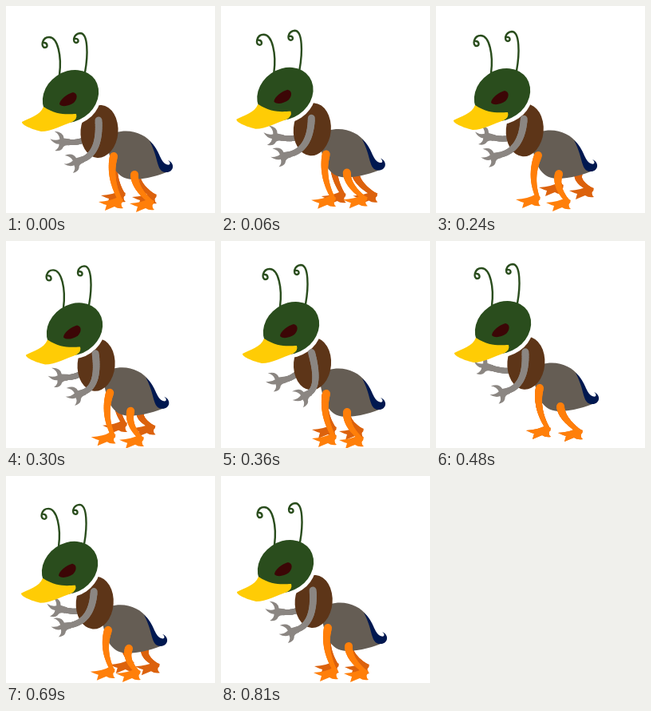
An HTML page with a canvas for the animation above (0.84 s loop, 262 px wide and 259 px high).

```html
<!DOCTYPE html>
<html lang="en">
<head>
<meta charset="utf-8">
<title>Walking duck-ant</title>
<style>
  html, body { margin: 0; width: 100%; height: 100%; overflow: hidden; background: #fff; }
  canvas { display: block; }
</style>
</head>
<body>
<canvas id="stage" width="262" height="259"></canvas>
<script>
const ctx = document.getElementById('stage').getContext('2d');
const LOOP = 840, STEP = 30;
const GREEN = '#2a4d1d', BROWN = '#5d3518', GREY = '#655d54', ARM = '#8b8682',
      NAVY = '#001850', YELLOW = '#ffcc05', ORANGE = '#ff7f0a', SHADE = '#dc620d', EYE = '#3c0606';

// Key poses: positions of each moving joint at the given times.
const times = [0, 150, 240, 360, 480, 600, 810];
const tracks = {
  head:      [[81, 113], [80, 106], [83, 111], [88, 109], [84, 108], [80, 115], [81, 113]],
  abdomen:   [[158, 187], [150, 182], [151, 186], [155, 190], [153, 183], [148, 192], [157, 189]],
  nearHand:  [[93, 193], [70, 178], [77, 187], [109, 191], [88, 188], [70, 184], [93, 193]],
  farHand:   [[76, 170], [70, 157], [69, 164], [77, 174], [67, 158], [68, 164], [76, 170]],
  frontFoot: [[144, 244], [136, 239], [128, 241], [142, 246], [141, 236], [129, 242], [144, 245]],
  backFoot:  [[183, 246], [176, 236], [166, 245], [176, 248], [181, 239], [159, 245], [182, 246]],
  farShift:  [[3, -8], [26, -2], [29, -15], [0, -11], [0, 0], [34, -8], [1, -8]]
};

const shapes = {
  abdomen: 'M-32-22C-12-38 16-29 26-14C33 0 36 14 46 20C36 24 18 30 0 30C-20 29-28 12-32-22Z',
  tail: 'M22-18C34-8 34 4 41 10C47 14 50 10 45 6C55 10 52 22 42 21C30 20 34 4 22-18Z',
  beak: 'M-34 13C-38 24-52 27-61 32C-62 36-46 42-37 44C-24 44-10 36 2 32Q9 28 7 22C-2 22-16 25-34 13Z',
  eye: 'M-14 10C-14 4-4-3 3-5C9-4 9 3 4 8C-2 12-10 14-14 10Z',
  antennae: 'M-14-27C-11-50-16-74-27-74C-36-74-38-61-32-61C-28-61-29-67-33-67' +
            'M18-30C22-52 22-79 12-79C3-78 2-67 7-67C11-67 10-73 6-72',
  hand: 'M-4-4Q3-4 4-9Q6-13 13-13Q8-9 9-4Q15-5 21 1Q14-1 9 2Q10 8 17 11Q6 12 4 4L-4 4Z',
  foot: 'M-4-5Q-12 0-28 1Q-22 4-18 5L-20 12Q-13 9-8 7Q-4 10 3 9Q-2 5 3-2Z'
};
for (const name in shapes) shapes[name] = new Path2D(shapes[name]);

const add = (p, x, y) => [p[0] + x, p[1] + y];

// Smooth cyclic curve through the key poses.
function sample(keys, t) {
  const n = times.length;
  const time = i => times[(i + n) % n] + Math.floor(i / n) * LOOP;
  const key = i => keys[(i + n) % n];
  let i = n - 1;
  while (times[i] > t) i--;
  const span = time(i + 1) - time(i), u = (t - time(i)) / span;
  return [0, 1].map(axis => {
    const slope = j => (key(j + 1)[axis] - key(j - 1)[axis]) / (time(j + 1) - time(j - 1)) * span;
    const a = key(i)[axis], b = key(i + 1)[axis], ease = u * u * (3 - 2 * u);
    return a + (b - a) * ease + u * (1 - u) * ((1 - u) * slope(i) - u * slope(i + 1));
  });
}

function fill(name, [x, y], color, angle = 0) {
  ctx.save();
  ctx.translate(x, y);
  ctx.rotate(angle);
  ctx.fillStyle = color;
  ctx.fill(shapes[name]);
  ctx.restore();
}

function oval([x, y], rx, ry, angle, color) {
  ctx.fillStyle = color;
  ctx.beginPath();
  ctx.ellipse(x, y, rx, ry, angle, 0, Math.PI * 2);
  ctx.fill();
}

// Bent limb that tapers from w0 to w1; returns the direction at its end.
function limb(a, b, bendX, bendY, w0, w1, color) {
  const c = [(a[0] + b[0]) / 2 + bendX, (a[1] + b[1]) / 2 + bendY];
  const at = u => [0, 1].map(k => (1 - u) ** 2 * a[k] + 2 * u * (1 - u) * c[k] + u * u * b[k]);
  ctx.strokeStyle = color;
  ctx.lineCap = 'round';
  for (let i = 0; i < 24; i++) {
    ctx.lineWidth = w0 + (w1 - w0) * i / 23;
    ctx.beginPath();
    ctx.moveTo(...at(i / 24));
    ctx.lineTo(...at((i + 1) / 24));
    ctx.stroke();
  }
  return Math.atan2(b[1] - c[1], b[0] - c[0]);
}

function leg(hip, ankle, color) {
  limb(hip, ankle, -11, 0, 10, 5, color);
  fill('foot', ankle, color);
}

function arm(shoulder, palm, bendX, bendY, width) {
  fill('hand', palm, ARM, limb(shoulder, palm, bendX, bendY, width, 7, ARM));
}

function draw(t) {
  const pose = {};
  for (const name in tracks) pose[name] = sample(tracks[name], t);
  const { head, abdomen, nearHand, farHand, frontFoot, backFoot, farShift } = pose;
  const thorax = [117 + (abdomen[0] - 158) * 0.82, 157 + (head[1] - 113) * 0.85];
  const frontHip = add(abdomen, -23, 1), backHip = add(abdomen, 3, 24);

  ctx.fillStyle = '#fff';
  ctx.fillRect(0, 0, 262, 259);

  for (const [hip, foot] of [[frontHip, frontFoot], [backHip, backFoot]])
    leg(add(hip, farShift[0] * 0.85, 0), add(foot, ...farShift), SHADE);
  arm(add(thorax, -16, 9), farHand, 2, 4, 7);
  fill('abdomen', abdomen, GREY);
  fill('tail', abdomen, NAVY);
  leg(backHip, backFoot, ORANGE);
  leg(frontHip, frontFoot, ORANGE);

  oval(thorax, 23.5, 33, 0.08, BROWN);
  oval(add(head, 3, 4), 37, 31, -0.6, '#fff');
  arm(add(thorax, -1, -14), nearHand, 14, 18, 9);

  oval(head, 37, 31, -0.6, GREEN);
  fill('beak', head, YELLOW);
  fill('eye', head, EYE);
  ctx.save();
  ctx.translate(...head);
  ctx.strokeStyle = GREEN;
  ctx.lineWidth = 2.4;
  ctx.stroke(shapes.antennae);
  ctx.restore();
}

function tick() {
  draw(Math.floor(performance.now() % LOOP / STEP) * STEP);
  requestAnimationFrame(tick);
}
tick();
</script>
</body>
</html>
```
